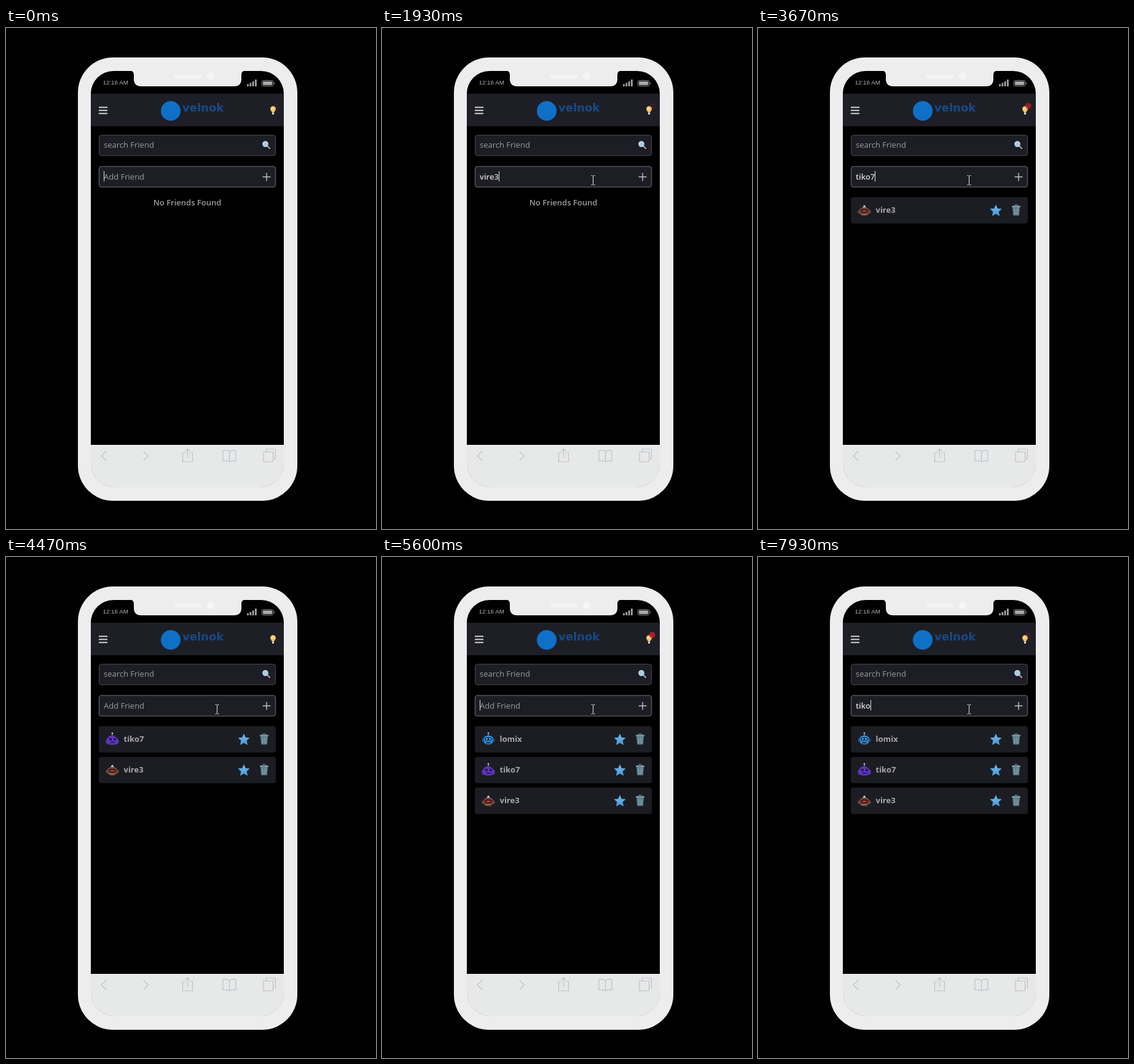
Recreate the animation shown at these times as an HTML page. Size 602 by 816 pixels, loop 8 s.

```html
<!DOCTYPE html>
<html lang="en">
<head>
<meta charset="utf-8">
<title>Friend list</title>
<style>
  html, body { margin: 0; width: 100%; height: 100%; overflow: hidden; background: #000; }
  svg { position: absolute; left: 0; top: 0; display: block; }
  text, #field { font-family: "Open Sans", "Noto Sans", sans-serif; font-size: 13px; }
  .hint { fill: #9b9ba0; }
  .name { fill: #a8a8ac; font-weight: 700; }
  .clock { font-family: "Liberation Sans", Arial, sans-serif; font-size: 9.8px; fill: #b4b4b8; }
  .brand { font-family: "DejaVu Sans", sans-serif; font-size: 18px; font-weight: 700; fill: #174a88; }
  .line { fill: none; stroke: #c0c1cb; stroke-width: 1.2; }

  #field { position: absolute; left: 159px; top: 233px; height: 18px; line-height: 18px; white-space: pre; }
  #typed { color: #d6d6d9; font-weight: 600; }
  #caret { display: inline-block; width: 1px; height: 17px; margin-right: -1px; background: #e4e4e6; vertical-align: top; }
  #ghost { color: #9b9ba0; }

  #alert { animation: alert 1s linear infinite; }
  @keyframes alert {
    0% { opacity: .09; }
    23% { opacity: 0; }
    56% { opacity: 0; }
    56.1% { opacity: .88; }
    62% { opacity: .8; }
    75% { opacity: .48; }
    93% { opacity: .14; }
    100% { opacity: .09; }
  }
</style>
</head>
<body>
<svg width="602" height="816" viewBox="0 0 602 816">
  <defs>
    <clipPath id="screen"><rect x="138" y="70" width="314" height="678" rx="37"/></clipPath>
    <linearGradient id="starFill" x2="0" y2="1">
      <stop offset="0" stop-color="#7cc0ee"/><stop offset="1" stop-color="#4596d6"/>
    </linearGradient>

    <g id="star">
      <path d="M0-9 2.6-3.2 8.8-2.7 4.2 1.6 5.5 8 0 4.8-5.5 8-4.2 1.6-8.8-2.7-2.6-3.2Z"
        fill="url(#starFill)" stroke="#4f9fdb" stroke-linejoin="round"/>
    </g>
    <g id="bin">
      <path d="M-6-5H6L4.8 8.5H-4.8Z" fill="#567684"/>
      <path d="M-3.2-3-2.6 7M0-3V7M3.2-3 2.6 7" stroke="#93afba" stroke-width="1.1"/>
      <rect x="-7" y="-7.5" width="14" height="2.8" rx="1.2" fill="#7c9ba8"/>
      <path d="M-2.3-7.5V-9H2.3V-7.5" fill="none" stroke="#7c9ba8"/>
    </g>

    <g id="brownBot">
      <path d="M-4-3 0-9 4-3Z" fill="#d5d0ca"/>
      <path d="M-8-1Q-6-5 0-5T8-1L10.5 1V4L8 5Q5 9 0 9T-8 5L-10.5 4V1Z" fill="#6c4a3e"/>
      <ellipse cy="1" rx="6.5" ry="3.2" fill="#2a1513"/>
      <path d="M-5 1Q0-2 5 1 0 4-5 1Z" fill="#c93a32"/>
      <path d="M-4 6.5H4" stroke="#a07a68"/>
    </g>
    <g id="violetBot">
      <path d="M0-5V-10" stroke="#b9b6c4"/>
      <circle cy="-10" r="1.3" fill="#cfccd8"/>
      <path d="M-7-3Q-4-7 1-6T8-1L10.5 1V6L7 8Q0 10-7 8L-10.5 6V1Z" fill="#5b35b8"/>
      <circle cx="-3" r="1.9" fill="#1b1038"/><circle cx="4" r="1.9" fill="#1b1038"/>
      <path d="M-3 5H4" stroke="#2c1767" stroke-width="2"/>
    </g>
    <g id="blueBot">
      <path d="M0-6V-10" stroke="#9fb4c6"/>
      <circle cy="-10" r="1.4" fill="#7fb9e8"/>
      <rect x="-10" y="-2" width="20" height="6" rx="2" fill="#1f5c99"/>
      <path d="M-7-4Q0-9 7-4V6Q0 11-7 6Z" fill="#2f86d6"/>
      <rect x="-5.5" y="-3" width="11" height="5" rx="2" fill="#0d2238"/>
      <circle cx="-2.6" cy="-.5" r="1.4" fill="#6fd0ff"/><circle cx="2.6" cy="-.5" r="1.4" fill="#6fd0ff"/>
      <path d="M-3.5 5.5H3.5" stroke="#0d2238" stroke-width="1.8"/>
    </g>
  </defs>

  <!-- phone body -->
  <rect x="117" y="48" width="357" height="722" rx="57" fill="#ededee"/>
  <g clip-path="url(#screen)">
    <rect x="138" y="70" width="314" height="609"/>
    <rect x="138" y="107" width="314" height="53" fill="#1e1f26"/>
    <rect x="138" y="679" width="314" height="70" fill="#e7e8e8"/>
    <path d="M138 679.5H452" stroke="#f6f6f6"/>
  </g>
  <path d="M138.5 711A37 37 0 0 0 175 747.5M415 747.5A37 37 0 0 0 451.5 711" fill="none" stroke="#d2d3d5" stroke-width=".8"/>
  <path d="M202 69.5Q208 70 208 76V83Q208 95 220 95H371Q383 95 383 83V76Q383 70 389 69.5Z" fill="#ededee"/>
  <rect x="274" y="76" width="45" height="6" rx="3" fill="#f4f4f5"/>
  <circle cx="333" cy="78.5" r="6" fill="#f5f5f6"/>

  <!-- status bar -->
  <text class="clock" x="157.5" y="92">12:16 AM</text>
  <path d="M393.5 95V91.5M397.8 95V89.5M402.1 95V87M406.4 95V84" stroke="#a2a2a7" stroke-width="2.8"/>
  <rect x="416.5" y="85.5" width="18" height="9" rx="2" fill="none" stroke="#8c8c91"/>
  <rect x="418" y="87" width="15" height="6" rx="1" fill="#a8a8ad"/>
  <path d="M436.3 88V92" stroke="#8c8c91"/>

  <!-- header -->
  <path d="M151 129.2H165M151 134.2H165M151 139.2H165" stroke="#cfcfd4" stroke-width="1.9"/>
  <circle cx="268" cy="135" r="16" fill="#0f70c8"/>
  <text class="brand" x="287" y="136">velnok</text>
  <path d="M434.5 127.2A4.5 4.5 0 0 1 439 131.7C439 134.5 436.6 135.2 436.4 137.5H432.6C432.4 135.2 430 134.5 430 131.7A4.5 4.5 0 0 1 434.5 127.2Z" fill="#fbc264"/>
  <circle cx="434" cy="131" r="2" fill="#ffdc94"/>
  <path d="M434.5 137.5V141" stroke="#d8d3cb" stroke-width="3"/>
  <circle id="alert" cx="439.7" cy="127" r="4.9" fill="#c81f22"/>

  <!-- inputs -->
  <rect x="151.5" y="174.5" width="287" height="33.5" rx="4" fill="#1d1e25" stroke="#48494f"/>
  <text class="hint" x="159" y="195">search Friend</text>
  <path d="M425.5 192.5 429 196" stroke="#a9a4a4" stroke-width="2.2" stroke-linecap="round"/>
  <circle cx="422" cy="189" r="4.2" fill="#9dcdf0" stroke="#dbe2e8" stroke-width="1.2"/>
  <rect x="151.5" y="225.5" width="287" height="33.5" rx="4" fill="#1d1e25" stroke="#50515c" stroke-width="1.6"/>
  <path d="M417.5 242.5H430.5M424 236V249" stroke="#c6c6ca" stroke-width="1.4"/>

  <text id="empty" class="hint" x="295" y="289" text-anchor="middle" font-weight="600">No Friends Found</text>
  <g id="list"></g>

  <!-- browser toolbar -->
  <g class="line">
    <path d="M163 689.5 155 697 163 704.5M223.5 689.5 231.5 697 223.5 704.5"/>
    <path d="M292 691.5H287.5V706.5H303.5V691.5H299M295.5 700V685.5M291.8 689 295.5 685.3 299.2 689"/>
    <path d="M363.5 689.5Q358 686.5 353 688.5V705.5Q358 704 363.5 706.5 369 704 374 705.5V688.5Q369 686.5 363.5 689.5ZV706"/>
    <path d="M419 690.5H434.5V706.5H419ZM423 690V686H438.5V702H435"/>
  </g>
</svg>

<div id="field"><span id="typed"></span><span id="caret"></span><span id="ghost">Add Friend</span></div>

<svg id="pointer" width="602" height="816" viewBox="0 0 602 816">
  <path d="M340.5 240.5H342.5L343.5 241.5 344.5 240.5H346.5M343.5 241V255M340.5 255.5H342.5L343.5 254.5 344.5 255.5H346.5" fill="none" stroke="#e8e8ea"/>
</svg>

<script>
  const LOOP = 8000, BLINK = 500;
  const $ = id => document.getElementById(id);
  const friends = [
    { name: 'vire3', bot: 'brownBot', added: 2070 },
    { name: 'tiko7', bot: 'violetBot', added: 3970 },
    { name: 'lomix', bot: 'blueBot', added: 5130 }
  ];

  // times at which each letter of the word is typed
  const type = (word, times) => times.map((at, i) => [at, word.slice(0, i + 1)]);
  const keys = [
    [-100, ''],
    ...type('vire3', [600, 730, 870, 1030, 1660]), [2070, ''],
    ...type('tiko7', [2530, 2670, 2800, 2900, 3600]), [3970, ''],
    ...type('lomix', [4530, 4660, 4800, 4930, 5060]), [5130, ''],
    ...type('tiko', [6330, 6470, 6660, 6830])
  ];

  for (const f of friends) {
    f.row = document.createElementNS('http://www.w3.org/2000/svg', 'g');
    f.row.innerHTML = `<rect x="151" y="275.5" width="288" height="43" rx="4" fill="#1c1d23"/>
      <use href="#${f.bot}" x="173" y="297"/>
      <text class="name" x="191.5" y="301">${f.name}</text>
      <use href="#star" x="387" y="297.5"/><use href="#bin" x="420" y="297"/>`;
    $('list').append(f.row);
  }

  function draw(t) {
    const [at, text] = keys.findLast(k => k[0] <= t);
    $('typed').textContent = text;
    $('ghost').style.display = text ? 'none' : '';
    $('caret').style.visibility = Math.floor((t - at) / BLINK) % 2 ? 'hidden' : 'visible';
    $('pointer').style.visibility = t < 70 ? 'hidden' : 'visible';

    const shown = friends.filter(f => f.added <= t);
    $('empty').style.display = shown.length ? 'none' : '';
    friends.forEach((f, i) => {
      f.row.style.display = f.added <= t ? '' : 'none';
      f.row.setAttribute('transform', `translate(0 ${50 * (shown.length - 1 - i)})`);
    });
  }

  let start;
  function tick(now) {
    start ??= now;
    draw((now - start) % LOOP);
    requestAnimationFrame(tick);
  }
  draw(0);
  requestAnimationFrame(tick);
</script>
</body>
</html>
```
